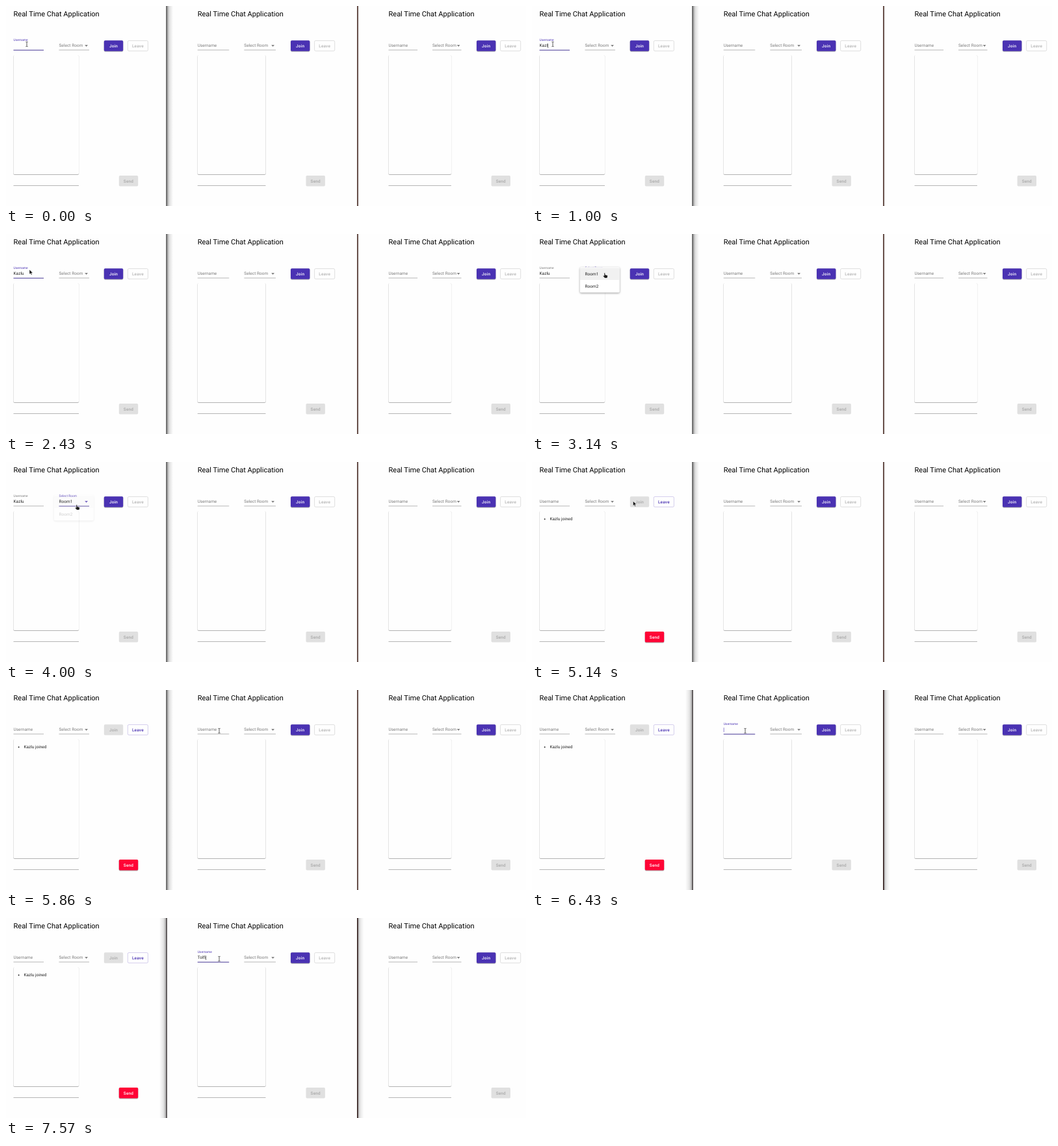
An HTML page for the animation above (8000 ms loop, 800 px wide and 309 px high).

```html
<!DOCTYPE html>
<html lang="en">
<head>
<meta charset="utf-8">
<title>Real Time Chat Application</title>
<style>
  html, body { margin: 0; width: 100%; height: 100%; overflow: hidden; background: #fefefe; }
  svg { display: block; width: 100vw; height: 100vh; }
  text { font-family: Roboto, sans-serif; text-rendering: geometricPrecision; white-space: pre; }
  .field { letter-spacing: .00938em; }
  .button { font-weight: 500; letter-spacing: .02857em; text-anchor: middle; }
  .menu { fill: #fff; filter: drop-shadow(0 1.2px 1.6px rgba(0,0,0,.4)); }
</style>
</head>
<body>
<svg id="stage" viewBox="0 0 800 309" preserveAspectRatio="none"></svg>
<script>
const stage = document.getElementById('stage');
const pen = document.createElement('canvas').getContext('2d');
const LOOP = 8000, FPS = 7, SIZE = 6.43;
const PRIMARY = '#4a32b3', INK = '#202020', GREY = '#7a7a7a', FOCUS = '#3d2c90';

// Left edges and widths of the three windows' controls
const panels = [
  { x: 11.5, name: 46.5, room: 81.5, roomW: 46.5, join: 150.8, leave: 187, list: 100.5, send: 173.8 },
  { x: 294.7, name: 48.5, room: 366.3, roomW: 48.7, join: 438, leave: 474.3, list: 104.8, send: 461.5 },
  { x: 588.5, name: 44.6, room: 656, roomW: 44.5, join: 724, leave: 760.3, list: 96.5, send: 746.6 }
];

const clamp = v => Math.max(0, Math.min(1, v));
const mix = (a, b, k) => a + (b - a) * k;
const ease = k => k * k * (3 - 2 * k);

const rect = (x, y, w, h, fill, more = '') =>
  `<rect x="${x}" y="${y}" width="${w}" height="${h}" fill="${fill}" ${more}/>`;
const text = (x, y, s, fill = INK, size = SIZE, cls = '') =>
  `<text x="${x}" y="${y}" fill="${fill}" font-size="${size}" class="${cls}">${s}</text>`;

// Raised surface: a faint rim and a stronger lower edge
const raised = (x, y, w, h, fill) =>
  rect(x - .5, y - .1, w + 1, h + 1.2, '#000', 'rx="2" opacity=".1"')
  + rect(x, y + .5, w, h + .4, '#000', 'rx="1.8" opacity=".22"')
  + rect(x, y, w, h, fill, 'rx="1.8"');

function textWidth(s) {
  pen.font = '100px Roboto, sans-serif';
  return pen.measureText(s).width * SIZE / 100 + s.length * SIZE * .00938;
}

const caption = (x, y, w, label, ink) => text(x + w / 2, y + 10.55, label, ink, SIZE, 'button');

function filledButton(x, y, label, fill) {
  const w = 29.4, h = 16.5;
  return (fill ? raised(x, y, w, h, fill) : rect(x, y, w, h, '#e0e0e0', 'rx="1.8"'))
    + caption(x, y, w, label, fill ? '#fff' : '#a8a8a8');
}

function outlinedButton(x, y, label, active) {
  const w = 31.7, stroke = active
    ? `stroke="${PRIMARY}" stroke-opacity=".5" stroke-width=".46"`
    : 'stroke="#d2d2d2" stroke-width=".7"';
  return rect(x + .3, y + .3, w - .6, 15.9, 'none', 'rx="1.8" ' + stroke)
    + caption(x, y, w, label, active ? PRIMARY : '#b4b4b4');
}

// Text field whose label floats up as `up` goes from 0 to 1
function field(x, w, label, { value = '', up = 0, focus = false, caret = false }) {
  const line = focus ? rect(x, 67.7, w, .95, FOCUS) : rect(x, 67.7, w, .6, '#868686');
  const end = x + textWidth(value) + .1;
  return line
    + text(x, mix(63.4, 53.8, up), label, focus ? PRIMARY : GREY, mix(SIZE, SIZE * .75, up), 'field')
    + (value ? text(x, 63.4, value, INK, SIZE, 'field') : '')
    + (caret ? rect(end, 58.2, .6, 6.8, value ? '#222' : PRIMARY) : '');
}

function panel(p, s) {
  const arrow = p.room + p.roomW - 4.4;
  const select = s.select || {};
  let out = text(p.x, 15.8, 'Real Time Chat Application', '#000', 11.02)
    + field(p.x, p.name, 'Username', s.user || {})
    + field(p.room, p.roomW, 'Select Room', select)
    + `<path d="M${arrow - 2.4} 60.2h4.8l-2.4 2.5z" fill="${select.focus ? PRIMARY : '#707070'}"/>`
    + filledButton(p.join, 53.25, 'Join', s.joined ? '' : PRIMARY)
    + outlinedButton(p.leave, 53.25, 'Leave', s.joined)
    + raised(p.x, 76, p.list, 184, '#fefefe')
    + rect(p.x, 277, p.list, .6, '#868686')
    + filledButton(p.send, 262.05, 'Send', s.joined ? '#ff0436' : '');
  if (s.joined)
    out += `<circle cx="19.6" cy="88.2" r=".95" fill="${INK}"/>` + text(27.6, 90.3, s.joined + ' joined');
  return out;
}

function menu(open) {
  if (!open) return '';
  return `<g opacity="${open}"><rect class="menu" x="73.8" y="51.3" width="61" height="39.2" rx="1.8"/>`
    + rect(73.8, 52.5, 61, 18.5, '#f1f1f1')
    + text(81.6, 63.6, 'Room1', INK, SIZE, 'field')
    + text(81.6, 83.2, 'Room2', INK, SIZE, 'field') + '</g>';
}

const shapes = {
  arrow: '<path d="M0 0v7.2l1.7-1.5 1.2 2.6 1.2-.6-1.2-2.5h2.4z" fill="#111" stroke="#fff" stroke-width=".5"/>',
  beam: '<path d="M-1.6-3.6h1.1l.5.5.5-.5h1.1M-1.6 3.6h1.1l.5-.5.5.5h1.1M0-3.1v6.2" fill="none" stroke="#222" stroke-width=".75"/>',
  hand: '<path d="M0 .4q.8-.8 1.4.2l.3 2.5 2.7.6q1 .3.9 1.3l-.6 3H.9L-1.7 4.9q.1-1 1-.6l.8.5z" fill="#181818" stroke="#fff" stroke-width=".4"/>'
};

// [step, x, y, shape]; the pointer glides between stops
const route = [
  [0, 32, 59, 'beam'], [16, 32, 59, 'beam'], [17, 36, 55, 'arrow'], [20, 110, 60, 'hand'],
  [22, 111, 60, 'hand'], [24, 108, 66, 'hand'], [29, 108, 66, 'hand'], [34, 155.5, 60.5, 'hand'],
  [35, 155.5, 60.5, 'arrow'], [36, 155.5, 60.5, 'arrow'], [41, 328, 63, 'beam'], [56, 328, 63, 'beam']
];

function pointer(n) {
  const i = Math.max(0, route.findIndex(r => r[0] > n) - 1);
  const [a, ax, ay, shape] = route[i], [b, bx, by] = route[i + 1];
  const k = ease((n - a) / (b - a));
  const moving = n > a && Math.hypot(bx - ax, by - ay) > 30;
  return `<g transform="translate(${mix(ax, bx, k)} ${mix(ay, by, k)})">${shapes[moving ? 'arrow' : shape]}</g>`;
}

// Window borders; the active window throws its shadow over its neighbours
function borders(second) {
  const shade = (x, w, dir, power) =>
    rect(x, 0, w, 309, `url(#${dir})`, `opacity="${power}"`);
  return (second
    ? shade(236, 10.5, 'toRight', .38) + shade(541.5, 9, 'toLeft', .32)
    : shade(247.5, 9.5, 'toLeft', .45) + shade(541.5, 3, 'toLeft', .18))
    + rect(246.2, 0, 1.7, 309, second ? '#4c4849' : '#5f5f5f')
    + rect(540, 0, 1.8, 309, second ? '#3a2726' : '#5b403a');
}

const fade = (id, x1, x2) => `<linearGradient id="${id}" x1="${x1}" x2="${x2}"><stop offset="0" stop-opacity=".9"/>`
  + '<stop offset=".4" stop-opacity=".27"/><stop offset="1" stop-opacity="0"/></linearGradient>';
const defs = '<defs>' + fade('toLeft', 0, 1) + fade('toRight', 1, 0) + '</defs>';

// Text typed so far, given the step at which each letter count is reached
const typed = (word, n, keys) => word.slice(0, keys.reduce((c, [at, count]) => n >= at ? count : c, 0));

function draw(n) {
  const first = 'Kazlu', second = 'Tolfi';
  const joined = n >= 35, picked = n >= 27;
  const open = n < 20 ? 0 : n < 27 ? clamp((n - 19) / 2) : [.65, .2][n - 27] || 0;
  const one = joined ? { joined: first } : {
    user: {
      value: typed(first, n, [[2, 1], [5, 2], [7, 4], [10, 5]]),
      up: 1, focus: n < 20, caret: n >= 2 && n < 14
    },
    select: {
      value: picked ? 'Room1' : '',
      up: picked ? 1 : clamp((n - 19) / 2),
      focus: n >= 20
    }
  };
  const two = {
    user: {
      value: typed(second, n, [[47, 1], [49, 2], [51, 3], [52, 4], [53, 5]]),
      up: clamp((n - 42) / 2), focus: n >= 43, caret: n >= 45
    }
  };
  stage.innerHTML = defs + rect(0, 0, 800, 309, '#fefefe') + borders(n >= 42)
    + [one, two, {}].map((s, i) => panel(panels[i], s)).join('')
    + menu(open) + pointer(n);
}

let last = -1;
function tick(now) {
  const n = Math.floor(((now % LOOP) + 6) * FPS / 1000) % (LOOP * FPS / 1000);
  if (n !== last) draw(last = n);
  requestAnimationFrame(tick);
}
draw(0);
requestAnimationFrame(tick);
</script>
</body>
</html>
```
